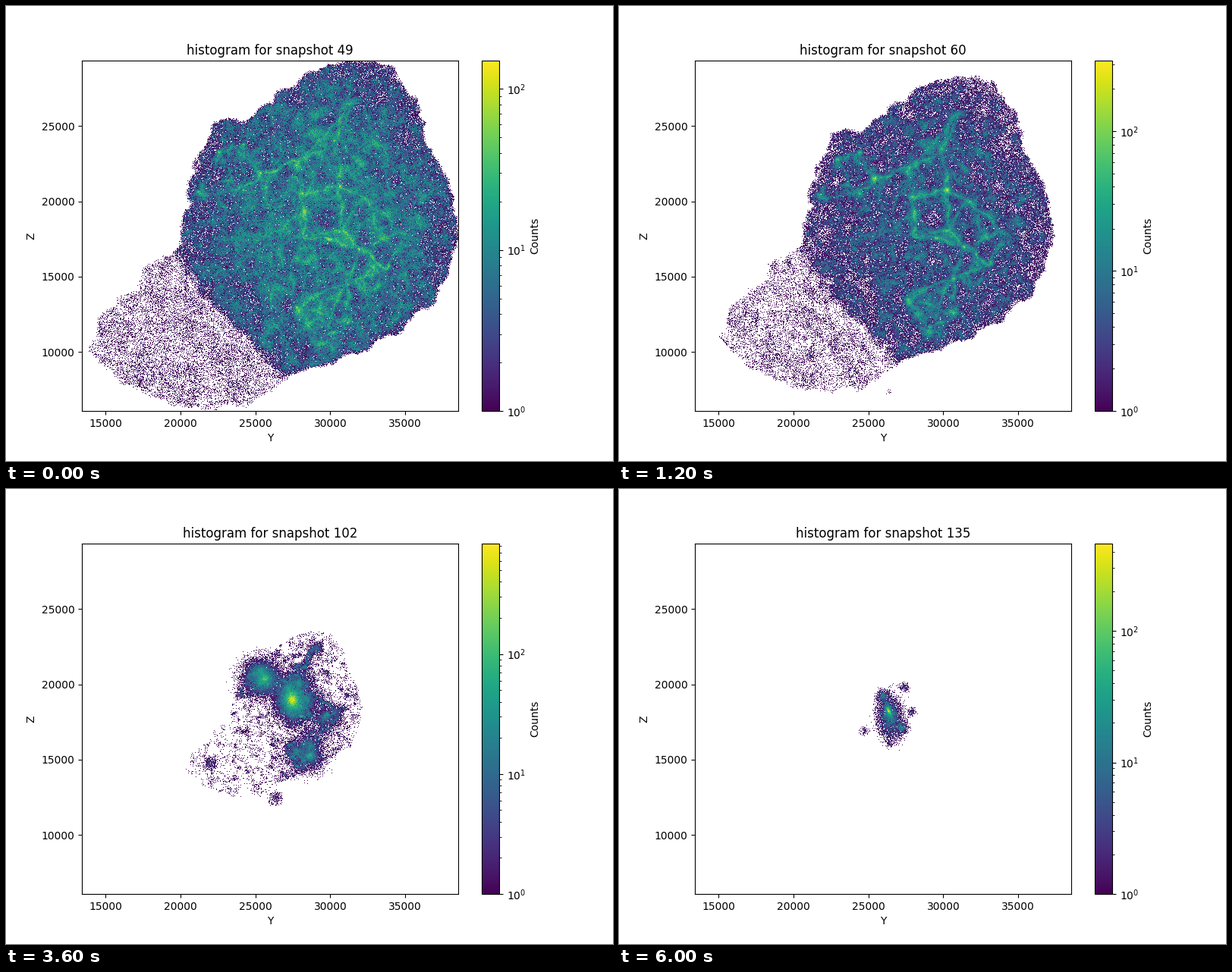
A matplotlib script for the animation above (6.2 s loop, 800 by 600 pixels).

```python
import numpy as np
import matplotlib.pyplot as plt
from matplotlib.animation import FuncAnimation
from matplotlib.colors import LogNorm
from matplotlib.path import Path

W, H, LEFT, TOP, PAD = 496, 462, 100, 72, 40
CX, CY = 355, 292                      # collapse centre, stage pixels
FRAMES, INTERVAL = 31, 200

# Key poses; everything else follows from the scale
KEYS = [0, 2, 6, 10, 14, 22, 30]
SNAPSHOT = [49, 53, 60, 70, 86, 118, 135]
SCALE = [1, .968, .903, .79, .632, .325, .18]
LOG_PEAK = [2.176, 2.451, 2.504, 2.866, 3.016, 2.826, 2.663]

OUTLINE = [(460, 73), (503, 78), (537, 117), (552, 185), (582, 235),
           (595, 300), (572, 377), (510, 432), (430, 467), (372, 488),
           (318, 525), (240, 531), (170, 508), (108, 455), (127, 405),
           (178, 368), (182, 348), (235, 315), (246, 215), (272, 158),
           (325, 147), (400, 87)]

# Halos as offsets from the centre, with mass. Satellites fall into sinks.
SINKS = [(85, -55, .9), (95, 125, .045), (-42, -110, .04), (112, -172, .009),
         (165, 5, .006), (-178, 145, .004), (0, 240, .003)]
SATELLITES = [(-20, -72, .25), (-42, -50, .05), (77, -115, .05), (84, 5, .05),
              (110, 28, .04), (95, 75, .045), (28, 105, .04), (60, 145, .015),
              (-75, -100, .03), (35, -45, .05), (30, -88, .05),
              (40, 10, .015), (118, -38, .03), (150, 50, .01),
              (-102, -48, .01)]

rng = np.random.default_rng(7)
TY, TX = np.mgrid[-PAD:H + PAD, -PAD:W + PAD].astype(float)
TX += LEFT - CX
TY += TOP - CY
GY, GX = np.mgrid[TOP:TOP + H, LEFT:LEFT + W].astype(float)


def blur(a, sigma):
    fy = np.fft.fftfreq(a.shape[0])[:, None]
    fx = np.fft.fftfreq(a.shape[1])[None]
    kernel = np.exp(-2 * (np.pi * sigma) ** 2 * (fx ** 2 + fy ** 2))
    return np.fft.ifft2(np.fft.fft2(a) * kernel).real


def noise(sigma):
    g = blur(rng.normal(size=TX.shape), sigma)
    return g / g.std()


def ramp(x, low, high):
    return np.clip((x - low) / (high - low), 0, 1)


# Wavy coordinates make borders and strands irregular
WX = TX + 2.5 * noise(7) + .7 * noise(2)
WY = TY + 2.5 * noise(7) + .7 * noise(2)


def cloud():
    pts = np.column_stack([WX.ravel(), WY.ravel()])
    inside = Path(np.array(OUTLINE) - (CX, CY)).contains_points(pts)
    mask = blur(inside.reshape(TX.shape).astype(float), 1.5)
    mask[mask < .01] = 0
    return mask


def links(points, count=3, reach=120):
    """Pairs of near neighbours."""
    pairs = set()
    for i, p in enumerate(points):
        dist = np.hypot(*(points - p).T)
        near = np.argsort(dist)[1:count + 1]
        pairs |= {(min(i, j), max(i, j)) for j in near if dist[j] < reach}
    return sorted(pairs)


def strand_distance(points):
    best = np.full(TX.shape, 1e9)
    for i, j in links(points):
        a, d = points[i], points[j] - points[i]
        t = np.clip(((WX - a[0]) * d[0] + (WY - a[1]) * d[1]) / (d @ d), 0, 1)
        best = np.minimum(best, (WX - a[0] - t * d[0]) ** 2
                          + (WY - a[1] - t * d[1]) ** 2)
    return best


def build_layers():
    whole = cloud()
    # A slanted line parts the thin lobe from the main body
    main = whole * ramp(WX + 120 - (WY - 53) / 1.075, -10, 10)
    r2 = ((WX - 62) / 158) ** 2 + (WY / 190) ** 2
    core = main * np.exp(-r2 ** 2)
    web = sum(np.exp(-(noise(s) * s / 1.3) ** 2) for s in (6, 10, 16))
    d2 = strand_distance(np.array(SINKS + SATELLITES)[:, :2])
    return dict(
        whole=whole, main=main, core=core * np.exp(.25 * noise(4)),
        web=web * core,
        thin=(1 + d2 / 4) ** -1.2 * core * np.exp(.4 * noise(4)),
        thick=(1 + d2 / 25) ** -1.4 * (.05 * whole + .95 * core),
    )


LAYERS = build_layers()
GRAIN = .8 * noise(5) + .6 * noise(2.5)


def add_blob(field, x, y, rx, ry, peak, cut, tilt=0):
    reach = int(1.6 * cut * max(rx, ry)) + 2
    ix, iy = int(x) - LEFT, int(y) - TOP
    win = (slice(max(iy - reach, 0), iy + reach),
           slice(max(ix - reach, 0), ix + reach))
    dx, dy = GX[win] - x, GY[win] - y
    c, s = np.cos(tilt), np.sin(tilt)
    r2 = ((dx * c + dy * s) / rx) ** 2 + ((dy * c - dx * s) / ry) ** 2
    field[win] += peak * (1 + r2) ** -1.35 * np.exp(-(r2 / cut ** 2) ** 2)


def diffuse(s):
    """Layers shrunk about the centre, thinning as matter falls in."""
    ix = np.rint((np.arange(W) + LEFT - CX) / s).astype(int) + CX - LEFT + PAD
    iy = np.rint((np.arange(H) + TOP - CY) / s).astype(int) + CY - TOP + PAD
    grid = np.ix_(np.clip(iy, 0, TX.shape[0] - 1),
                  np.clip(ix, 0, TX.shape[1] - 1))
    fade = ramp(s, .18, .3)
    amount = dict(
        whole=.42 * s ** 1.4 * fade, main=1.3 * s ** 4,
        core=5.5 * s ** 7 + .15 * fade, web=5 * s ** 5,
        thin=15 * ramp(s, .72, .9),
        thick=65 * s * (1 - s) * ramp(s, .33, .6),
    )
    k = 1.5 - 1.2 * s
    field = sum(amount[name] * a[grid] for name, a in LAYERS.items())
    return field * np.exp(k * GRAIN[grid] - k * k / 2)


def add_halos(field, s, top):
    merge = 1 - ramp(s, .32, .6)
    power = np.clip(1 - 2 * (s - .632), 0, 1)
    width = min(1 + 7 * (1 - s), 18 * s)
    cut = 8 - 5 * merge

    sinks = np.array(SINKS)[:, :2]
    now = sinks.copy()
    now[0] *= ramp(s, .18, .73)
    now = now * s + (CX, CY)

    def halo(pos, mass, amount=1):
        if mass < .01:
            add_blob(field, *pos, 1.3 * width, 1.3 * width, top * mass,
                     min(cut, 1.6))
        else:
            add_blob(field, *pos, width, width, amount * top * mass ** power,
                     cut)

    # The main halo ends as a tilted, cuspy ellipse in a wider body
    x, y = now[0]
    add_blob(field, x, y, width * (1 - .7 * merge), width * (1 - .35 * merge),
             top * .95, 8, -.44 * merge)
    add_blob(field, x + 2, y + 9, 11, 19, 10 * merge, 1.7, -.14)
    for pos, (_, _, mass) in zip(now[1:], SINKS[1:]):
        halo(pos, mass)

    if merge < 1:
        for x, y, mass in SATELLITES:
            home = np.argmin(np.hypot(*(sinks - (x, y)).T))
            pos = np.array([CX + s * x, CY + s * y])
            halo(pos + merge * (now[home] - pos), mass, 1 - merge)


def counts(i, s, top):
    field = diffuse(s)
    add_halos(field, s, top)
    r = np.random.default_rng(100 + i)
    n = np.zeros((H, W))
    hit = field > .004
    lam = field[hit]
    n[hit] = r.poisson(lam * r.gamma(7, 1 / 7, lam.size))
    return np.ma.masked_equal(n, 0)


fig, ax = plt.subplots(figsize=(8, 6), dpi=100)
im = ax.imshow(np.ones((H, W)), norm=LogNorm(1, 150), cmap="viridis",
               extent=(13409, 38548, 6070, 29350), aspect="auto",
               interpolation="nearest")
fig.colorbar(im, ax=ax, label="Counts")
ax.set_xlabel("Y")
ax.set_ylabel("Z")
title = ax.set_title("")


def update(i):
    snap, s, log_peak = (np.interp(i, KEYS, track)
                         for track in (SNAPSHOT, SCALE, LOG_PEAK))
    top = 10 ** log_peak
    im.set_data(counts(i, s, top))
    im.set_clim(1, top)
    title.set_text(f"histogram for snapshot {round(snap)}")
    return im, title


anim = FuncAnimation(fig, update, frames=FRAMES, interval=INTERVAL,
                     repeat=True, repeat_delay=0, blit=False)
plt.show()
```
